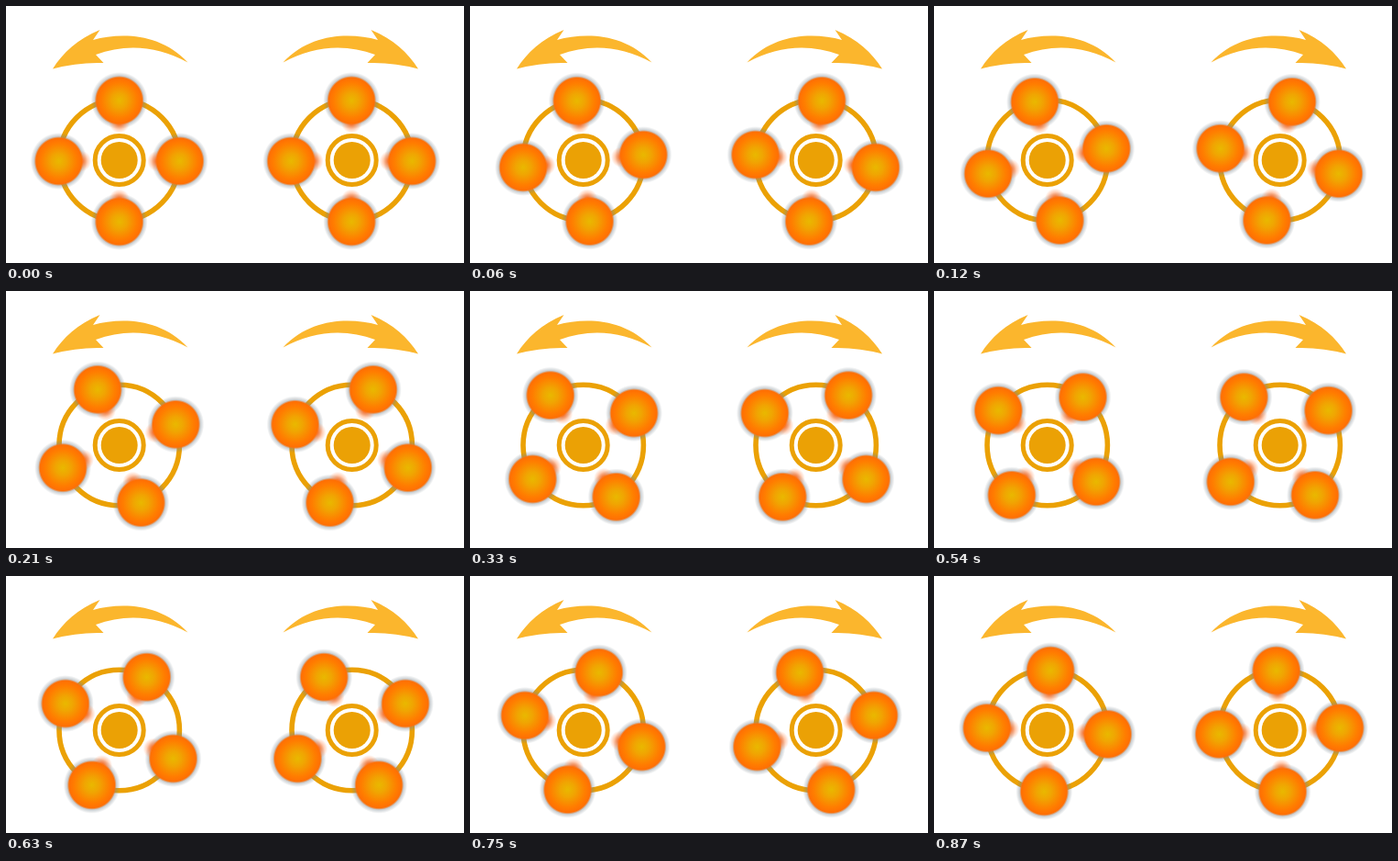
An HTML page that plays this animation: 500 px wide and 280 px high, repeating every 900 ms.

```html
<!DOCTYPE html>
<html lang="en">
<head>
<meta charset="utf-8">
<title>Counter-rotating wheels</title>
<style>
  html, body { margin: 0; width: 100%; height: 100%; overflow: hidden; background: #fff; }
  svg { display: block; width: 100%; height: 100%; }
</style>
</head>
<body>
<svg viewBox="0 0 500 280">
  <defs>
    <radialGradient id="fill">
      <stop offset="0" stop-color="#e9b800"/>
      <stop offset=".3" stop-color="#f0a502"/>
      <stop offset=".72" stop-color="#ff7d00"/>
      <stop offset=".92" stop-color="#ff6f04"/>
      <stop offset="1" stop-color="#ff7a18" stop-opacity="0"/>
    </radialGradient>
    <radialGradient id="halo">
      <stop offset=".78" stop-color="#76838c" stop-opacity=".65"/>
      <stop offset="1" stop-color="#76838c" stop-opacity="0"/>
    </radialGradient>
    <radialGradient id="glow">
      <stop offset=".2" stop-color="#ff6a1c" stop-opacity=".85"/>
      <stop offset="1" stop-color="#ff8a50" stop-opacity="0"/>
    </radialGradient>
    <g id="ball">
      <circle cy="-66" r="31" fill="url(#halo)"/>
      <circle cy="-42" r="11.5" fill="url(#glow)"/>
      <circle cy="-66" r="27" fill="url(#fill)"/>
    </g>
    <g id="balls">
      <use href="#ball"/>
      <use href="#ball" transform="rotate(90)"/>
      <use href="#ball" transform="rotate(180)"/>
      <use href="#ball" transform="rotate(270)"/>
    </g>
    <circle id="ring" r="65.7" fill="none" stroke="#eba105" stroke-width="5.6"/>
    <g id="hub">
      <circle r="26.5" fill="#fff" stroke="#eba105" stroke-width="5"/>
      <circle r="20" fill="#eba105"/>
    </g>
    <path id="arrow" fill="#fbb62d" d="M51 68.500C62 51 78 36 102.500 26L95 37C125 29 168 29 198.500 61.500C165 43 130 41 98 53L106.500 62Q78 61 51 68.500Z"/>
  </defs>
  <use href="#arrow"/>
  <use href="#arrow" transform="translate(501 0) scale(-1 1)"/>
  <g transform="translate(123.700 168)">
    <use href="#ring"/>
    <g transform="translate(0 1)"><use id="left" href="#balls"/></g>
    <use href="#hub"/>
  </g>
  <g transform="translate(377.700 168)">
    <use href="#ring"/>
    <g transform="translate(-.5 1)"><use id="right" href="#balls"/></g>
    <use href="#hub"/>
  </g>
</svg>
<script>
  const LOOP = 900, STEP = 30, DEGREES = 3;
  const left = document.getElementById('left');
  const right = document.getElementById('right');

  function draw() {
    const angle = Math.floor(performance.now() % LOOP / STEP) * DEGREES;
    left.setAttribute('transform', `rotate(${-angle})`);
    right.setAttribute('transform', `rotate(${angle})`);
    requestAnimationFrame(draw);
  }
  draw();
</script>
</body>
</html>
```
